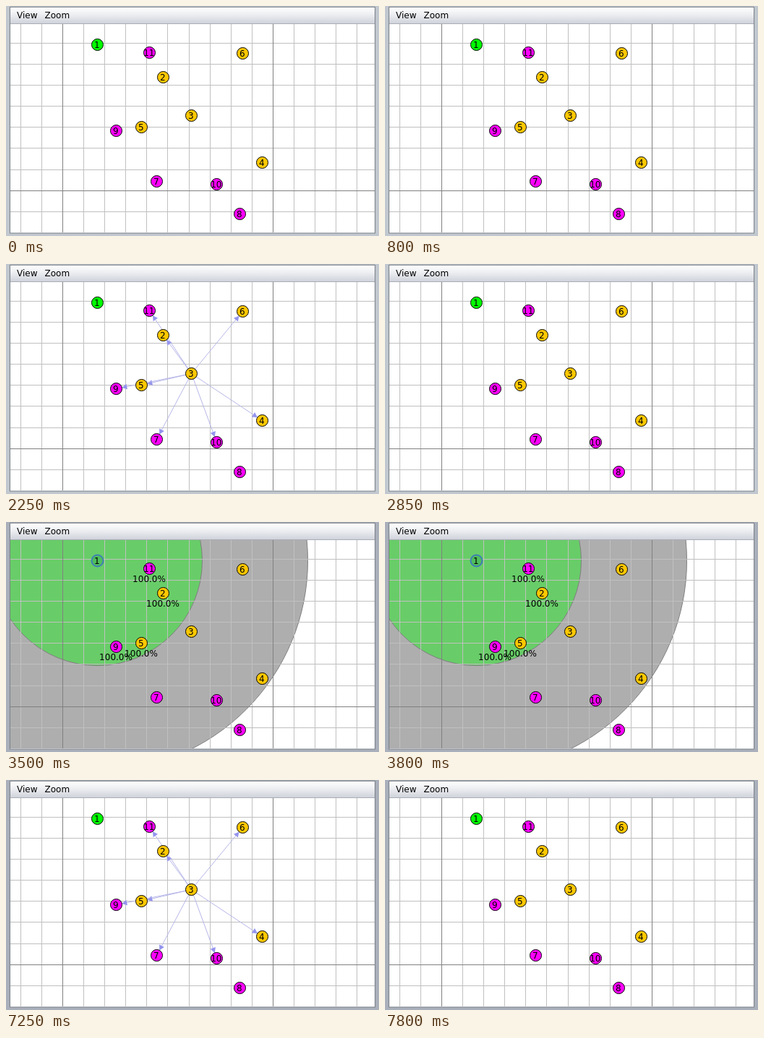
Write an HTML page that moves like this. It is 516 px wide and 318 px high and loops after 8000 ms.

```html
<!DOCTYPE html>
<html lang="en">
<head>
<meta charset="utf-8">
<title>Radio network</title>
<style>
  html, body { margin: 0; width: 100%; height: 100%; overflow: hidden; }
  svg { display: block; width: 516px; height: 318px; }
  text { font: 12px "DejaVu Sans", sans-serif; fill: #000; }
  .mid { text-anchor: middle; }
</style>
</head>
<body>
<svg id="stage" viewBox="0 0 516 318">
  <defs>
    <linearGradient id="bar" x1="0" y1="0" x2="0" y2="1">
      <stop offset="0" stop-color="#fff"/>
      <stop offset=".45" stop-color="#eceef1"/>
      <stop offset="1" stop-color="#d0d3db"/>
    </linearGradient>
    <clipPath id="view"><rect x="6" y="25" width="504" height="288"/></clipPath>
  </defs>
  <rect id="frame" width="516" height="318"/>
  <rect x="5.5" y="1.5" width="505" height="312.5" fill="#fff" stroke="#7c8087"/>
  <rect x="6" y="2" width="504" height="22" fill="url(#bar)"/>
  <path d="M6 24.5H510" stroke="#a9adb5"/>
  <text x="15" y="17">View</text>
  <text x="53.5" y="17" textLength="">Zoom</text>
  <g id="scene" clip-path="url(#view)"></g>
</svg>
<script>
const LOOP = 8000, RANGE = 145.5;
const ORANGE = '#ffc800', PINK = '#ff00ff';

// id: x, y, colour
const nodes = {
  1: [126, 53, '#00ff00'], 2: [217, 98, ORANGE], 3: [256, 151, ORANGE],
  4: [354, 216, ORANGE], 5: [187, 167, ORANGE], 6: [327, 65, ORANGE],
  7: [208, 242, PINK], 8: [323, 287, PINK], 9: [152, 172, PINK],
  10: [291, 246, PINK], 11: [198, 64, PINK]
};

// sender, start, end
const bursts = [
  [2, 500, 650], [6, 650, 800], [9, 850, 900], [5, 1000, 1050],
  [10, 1250, 1350], [3, 2250, 2300], [7, 2500, 2600], [11, 2750, 2850],
  [8, 3750, 3800], [5, 6250, 6350], [10, 6500, 6550], [3, 7250, 7350],
  [7, 7550, 7600], [11, 7750, 7800]
];
const COVER = [3500, 6050];

const scene = document.getElementById('scene');
const frame = document.getElementById('frame');

function add(parent, tag, attrs, text) {
  const el = document.createElementNS('http://www.w3.org/2000/svg', tag);
  for (const k in attrs) el.setAttribute(k, attrs[k]);
  if (text) el.textContent = text;
  parent.appendChild(el);
  return el;
}
const show = (el, on) => el.setAttribute('visibility', on ? 'visible' : 'hidden');
const within = (t, a, b) => t >= a && t < b;

// Coverage discs lie below the grid
const cover = add(scene, 'g', {});
for (const [r, fill] of [[291, '#aeaeae'], [145, '#68cd68']])
  add(cover, 'circle', { cx: 126.5, cy: 53.5, r, fill, stroke: '#808080' });

function gridLines(main) {
  let d = '';
  for (let k = -2; k <= 14; k++)
    if ((k % 10 === 0) === main) d += `M${Math.floor(78.4 + 29.1 * k) + .5} 25V313`;
  for (let k = -7; k <= 1; k++)
    if ((k === 0) === main) d += `M6 ${Math.floor(255.15 + 29.1 * k) + .5}H510`;
  add(scene, 'path', { d, stroke: main ? '#808080' : '#c0c0c0' });
}
gridLines(false);
gridLines(true);

function arrow(parent, [x0, y0], [x1, y1]) {
  const a = Math.atan2(y1 - y0, x1 - x0);
  const tx = x1 + .5 - 8 * Math.cos(a), ty = y1 + .5 - 8 * Math.sin(a);
  const wing = s => `${tx - 8 * Math.cos(a + s)} ${ty - 8 * Math.sin(a + s)}`;
  add(parent, 'path', { d: `M${x0 + .5} ${y0 + .5}L${tx} ${ty}`, stroke: '#b6b6e8' });
  add(parent, 'path', { d: `M${tx} ${ty}L${wing(.5)}L${wing(-.5)}Z`, fill: '#9494ee' });
}

// One arrow group per sender; node 1 takes no part
const fans = {};
for (const [id] of bursts) {
  if (fans[id]) continue;
  const from = nodes[id];
  fans[id] = add(scene, 'g', {});
  for (const other in nodes) {
    const to = nodes[other];
    if (other == id || other == 1) continue;
    if (Math.hypot(to[0] - from[0], to[1] - from[1]) <= RANGE) arrow(fans[id], from, to);
  }
}

const discs = {};
for (const id in nodes) {
  const [x, y, fill] = nodes[id];
  discs[id] = add(scene, 'circle', { cx: x + .5, cy: y + .5, r: 8, fill, stroke: '#000' });
  add(scene, 'text', { x: x - .2, y: y + 5, class: 'mid' }, id);
}

const labels = add(scene, 'g', {});
for (const id of [2, 5, 9, 11])
  add(labels, 'text', { x: nodes[id][0], y: nodes[id][1] + 19, class: 'mid' }, '100.0%');

function draw(t) {
  const covered = within(t, ...COVER);
  show(cover, covered);
  show(labels, covered);
  frame.setAttribute('fill', t < COVER[0] ? '#c0c7ce' : '#a9b0bb');
  const one = discs[1];
  one.setAttribute('fill', covered ? '#4fbe5c' : nodes[1][2]);
  one.setAttribute('stroke', covered ? '#3f7fb5' : '#000');
  one.setAttribute('stroke-width', covered ? 2 : 1);
  for (const id in fans)
    show(fans[id], bursts.some(([s, a, b]) => s == id && within(t, a, b)));
}

const start = performance.now();
function tick() {
  draw((performance.now() - start) % LOOP);
  requestAnimationFrame(tick);
}
tick();
</script>
</body>
</html>
```
